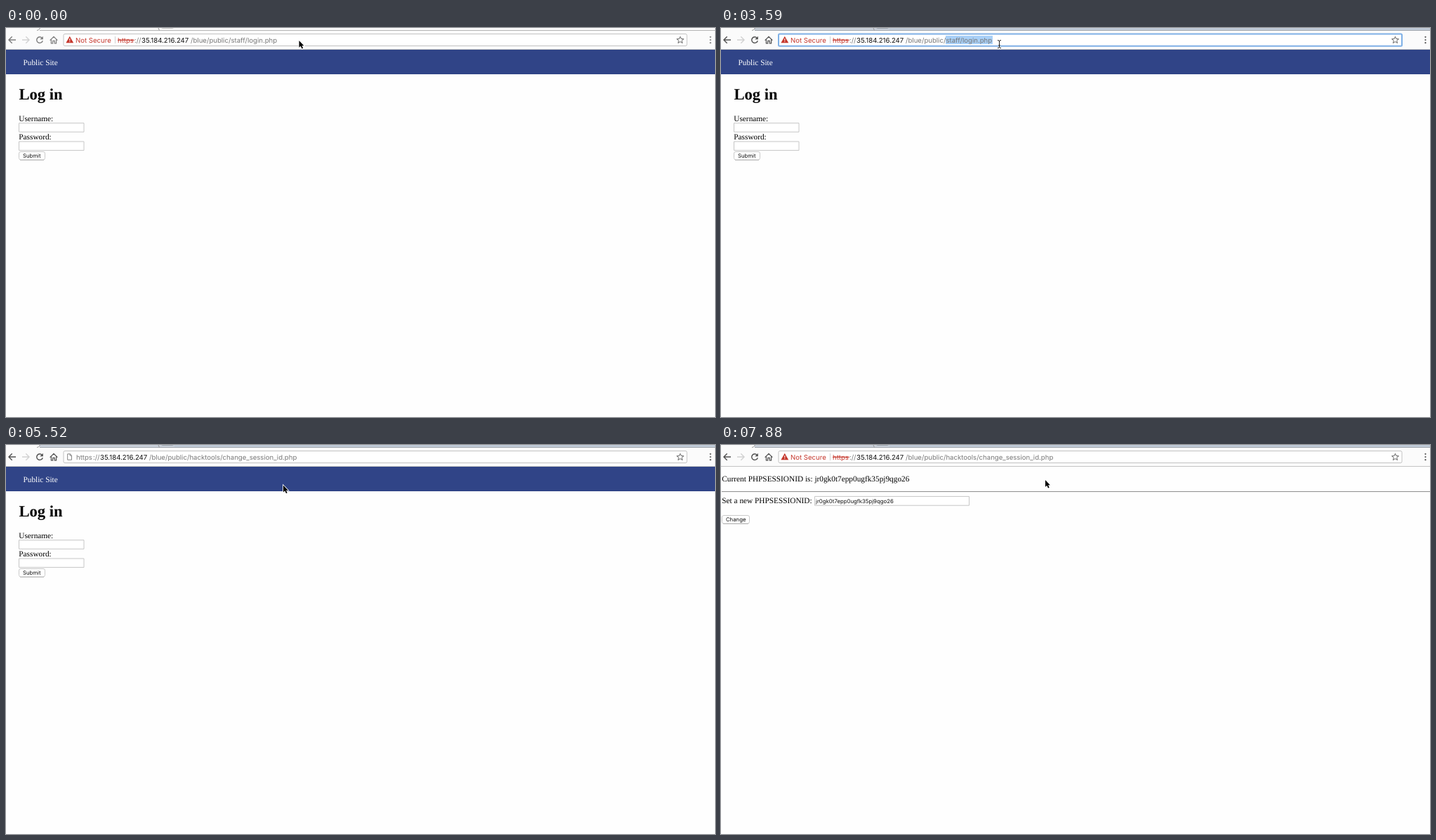
Write an HTML page with a canvas that moves like this. It is 1010 px wide and 555 px high and loops after 8000 ms.

```html
<!DOCTYPE html>
<html lang="en">
<head>
<meta charset="utf-8">
<title>Session page</title>
<style>
html, body { margin: 0; width: 100%; height: 100%; overflow: hidden; background: #fefefe; }
canvas { display: block; }
</style>
</head>
<body>
<canvas id="stage" width="1010" height="555"></canvas>
<script>
const ctx = document.getElementById('stage').getContext('2d');
const LOOP = 8000;
const UI = '9.6px Inter, sans-serif', UI_BOLD = '700 9.75px Inter, sans-serif';
const CONTROL = '7.8px Inter, sans-serif';
const SERIF = '11.3px "Liberation Serif", serif', HEADING = 'bold 22.6px "Liberation Serif", serif';
const GRAY = '#777', RED = '#c5372c', BLUE = '#2f5fd0', RING = '#7fb0e6';
const HOST = '35.184.216.247', BASE = '/blue/public/';
const HACK = 'hacktools/change_session_id.php', LOGIN = 'staff/login.php';
const SESSION = 'jr0gk0t7epp0ugfk35pj9qgo26';

const SUGGESTIONS = [
  ['', '- Plindrek', 279],
  [HACK, '- Change PHPSESSIONID', 432],
  [LOGIN, '- Log in', 346],
  [null, '- Default Search', 264],
  ['staff/index.php', '- Staff: Menu', 348],
];
const ROW_TOP = 33.3, ROW_HEIGHT = 17.75;

// Pointer moves: first step, last step, number of steps, waypoints.
const MOVES = [
  [920, 1510, 5, [[421, 24], [345, 9], [298, 12], [330, 17]]],
  [1810, 2410, 5, [[330, 17], [324, 17], [316, 17], [310.5, 17], [314, 17], [320, 17]]],
  [2860, 3590, 6, [[320, 17], [328, 17], [396.5, 23]]],
  [4790, 5520, 6, [[396.5, 23], [396, 40], [395, 57], [395, 57.5]]],
  [5820, 6840, 8, [[395, 57.5], [371, 58.5], [250, 85], [90, 104], [18, 108]]],
  [6980, 7880, 7, [[18, 108], [3, 109], [120, 92], [330, 62], [462, 50]]],
];

function text(string, x, y, font, color) {
  ctx.font = font;
  ctx.fillStyle = color;
  ctx.fillText(string, x, y);
}

function rect(x, y, w, h, color) {
  ctx.fillStyle = color;
  ctx.fillRect(x, y, w, h);
}

function box(x, y, w, h, radius, fill, stroke, width = 1) {
  ctx.beginPath();
  ctx.roundRect(x, y, w, h, radius);
  ctx.fillStyle = fill;
  ctx.fill();
  ctx.strokeStyle = stroke;
  ctx.lineWidth = width;
  ctx.stroke();
}

function path(d, x, y, stroke, width = 1, fill) {
  const shape = new Path2D(d);
  ctx.save();
  ctx.translate(x, y);
  if (stroke) {
    ctx.strokeStyle = stroke;
    ctx.lineWidth = width;
    ctx.stroke(shape);
  }
  if (fill) {
    ctx.fillStyle = fill;
    ctx.fill(shape);
  }
  ctx.restore();
}

function pointerAt(t) {
  if (t < 150) return [417.5, 18];
  const move = MOVES.findLast(m => t >= m[0]);
  if (!move) return MOVES[0][3][0];
  const [start, end, steps, points] = move;
  const step = Math.min(steps, 1 + Math.floor((t - start) / (end - start) * (steps - 1) + 0.05));
  const along = step / steps * (points.length - 1);
  const i = Math.min(Math.floor(along), points.length - 2);
  return points[i].map((v, axis) => v + (points[i + 1][axis] - v) * (along - i));
}

function selectionAt(t, x) {
  if (t < 320 || t >= 4340) return null;
  if (t < 620) return [159, 387];
  if (t < 2860) return [369, 387];
  return [320, Math.min(387, x)];
}

function button(label, x, y, w) {
  box(x, y, w, 11.5, 2.5, '#fff', '#c4c4c4', 0.9);
  rect(x + 1.5, y + 11.6, w - 3, 0.8, '#b0b0b0');
  text(label, x + 5.4, y + 8.6, CONTROL, '#111');
}

function loginPage() {
  rect(0, 30, 1010, 36, '#304487');
  text('Public Site', 24.5, 52.5, SERIF, '#fff');
  text('Log in', 18.5, 102, HEADING, '#000');
  text('Username:', 18.3, 132.5, SERIF, '#000');
  box(18.5, 135.7, 92.5, 12.6, 0, '#fff', '#c6c6c6');
  text('Password:', 18.3, 159, SERIF, '#000');
  box(18.5, 162, 92.5, 12.6, 0, '#fff', '#c6c6c6');
  button('Submit', 18.5, 176.5, 37);
}

function sessionPage() {
  text('Current PHPSESSIONID is: ' + SESSION, 1.3, 52, SERIF, '#000');
  rect(1, 66, 1009, 1, '#8e8e8e');
  text('Set a new PHPSESSIONID:', 1.3, 83, SERIF, '#000');
  box(133.5, 73.4, 220, 12.8, 0, '#fff', '#c6c6c6');
  text(SESSION, 135, 82.7, CONTROL, '#111');
  button('Change', 1.5, 100.5, 39);
}

function tabStrip(active) {
  rect(0, 0, 1010, 30, '#fbfbfb');
  rect(48, 0, 962, 3, active ? '#c9d0da' : '#fafafa');
  if (active) rect(240, 0, 770, 3, '#c0cad7');
  rect(48, 3, 962, 1, active ? '#a4a9b0' : '#b4b4b4');
  path('M44 3.5Q47 3.5 48.5 0M217 0L218.5 3.5', 0, 0, '#999');
  path('M221 0H239L237 1H223Z', 0, 0, null, 1, active ? '#9da5af' : '#c8c8c8');
  rect(0, 30, 1010, 1, '#c4c4c4');
}

function navigation(active) {
  const ink = active ? '#505050' : '#7d7d7d';
  const arrow = 'M0 0H10M4.7 -4.7L0 0L4.7 4.7';
  path(arrow, 4, 17, ink, 1.4);
  path('M0 0H-10M-4.7 -4.7L0 0L-4.7 4.7', 33, 17, '#d2d2d2', 1.4);
  path('M3.2 -2.9A4.3 4.3 0 1 0 4.2 1.2', 48, 17, ink, 1.4);
  path('M4.8 -5.2V-.7H.3Z', 48, 17, null, 1, ink);
  path('M-5.4 .6L0 -4.6L5.4 .6M-3.6 -.5V4.8H-1.3V1.3H1.3V4.8H3.6V-.5', 68, 17, ink, 1.2);
  for (const y of [12.8, 17, 21.2]) {
    ctx.beginPath();
    ctx.arc(1003.5, y, 1.1, 0, 7);
    ctx.fillStyle = ink;
    ctx.fill();
  }
}

function star() {
  let d = '';
  for (let i = 0; i < 10; i++) {
    const angle = -Math.PI / 2 + i * Math.PI / 5, r = i % 2 ? 2.3 : 5.2;
    d += (i ? 'L' : 'M') + r * Math.cos(angle) + ' ' + r * Math.sin(angle);
  }
  path(d + 'Z', 960.5, 17.3, '#666', 1);
}

function documentIcon(y) {
  path('M-2.8 -4.2H.9L3 -2.1V4.2H-2.8ZM.7 -4.2V-1.9H3', 90.5, y, '#777', 0.9);
}

function url(x, tail, insecure) {
  text('https', x, 20.5, UI, insecure ? RED : GRAY);
  if (insecure) rect(x, 16.8, 24, 1, RED);
  text('://', x + 23.9, 20.5, UI, GRAY);
  text(HOST, x + 34, 20.5, UI, '#111');
  text(BASE + tail, x + 104, 20.5, UI, GRAY);
}

function warning(opening) {
  ctx.save();
  if (opening) ctx.globalAlpha = 0.8;
  path('M0 -5L5.4 4.5H-5.4Z', 90.8, 16.8, null, 1, RED);
  rect(90.3, 15, 1, 3.3, '#fff');
  rect(90.3, 19, 1, 1, '#fff');
  if (opening) {
    ctx.beginPath();
    ctx.rect(100, 8, 30.5, 18);
    ctx.clip();
    text('Not Secure', 102.5, 20, '8.6px Inter, sans-serif', RED);
  } else {
    text('Not Secure', 99, 20.5, UI, RED);
    rect(155, 12, 1, 10, '#d0d0d0');
  }
  ctx.restore();
}

function addressBar(t, x) {
  const focused = t >= 150 && t < 5520, typing = t >= 4340 && t < 5520;
  if (focused) box(82, 8.5, 888, 17.2, 1.5, '#fff', RING, 2);
  else box(82, 8.5, 888, 17, 2, '#fff', '#c2c2c2');
  if (!typing) star();
  const selection = selectionAt(t, x);
  if (selection) rect(selection[0], 11, selection[1] - selection[0], 12, '#a9d0f7');

  if (t >= 4340 && t < 5820) {
    const chosen = t >= 5365;
    documentIcon(17);
    url(100, chosen ? HACK : '', false);
    if (typing) rect(chosen ? 413.3 : 260.3, 11, 1, 12, '#111');
  } else {
    const opening = t >= 5820 && t < 5960;
    warning(opening);
    url(opening ? 140.5 : 159, t < 4340 ? LOGIN : HACK, true);
  }
}

function suggestions(chosen, hovered) {
  rect(355, 126, 545, 2, '#f3f3f3');
  rect(0, 31, 1010, 94, '#fff');
  rect(0, 125, 1010, 1, '#c6c6c6');
  rect(0, 126, 1010, 1, '#efefef');
  SUGGESTIONS.forEach(([tail, title, titleX], i) => {
    const top = ROW_TOP + i * ROW_HEIGHT, middle = top + 9.2, baseline = top + 12.9;
    if (i === chosen) rect(0, Math.round(top), 1010, 18, '#e9e9e9');
    else if (i === hovered) rect(0, Math.round(top), 1010, 18, '#f3f3f3');
    const address = 'https://' + HOST + BASE;
    if (tail === null) {
      path('M2 1A3 3 0 1 1 2 -3A3 3 0 0 1 2 1L4.5 3.8', 89.3, middle + 0.6, '#777', 1.1);
      text(address, 100, baseline, UI, '#111');
    } else {
      documentIcon(middle);
      text(address, 100, baseline, UI_BOLD, BLUE);
      text(tail, 275, baseline, UI, BLUE);
    }
    text(title, titleX, baseline, UI, '#666');
  });
}

function pointer(t, x, y) {
  if (t < 150 || y > 31) {
    path('M0 0V9.8L2.3 7.8L4 11.6L5.7 10.8L4 7.2H6.9Z', x, y, '#fff', 1.6, '#000');
  } else {
    const beam = 'M-2.5 -5.5Q0 -5.5 0 -4Q0 -5.5 2.5 -5.5M0 -4V4.2M-1.3 1.8H1.3M-2.5 5.6Q0 5.6 0 4.2Q0 5.6 2.5 5.6';
    path(beam, x, y, 'rgba(255,255,255,.7)', 2);
    path(beam, x, y, '#222', 1);
  }
}

function draw() {
  const t = performance.now() % LOOP;
  const [x, y] = pointerAt(t);
  const active = t >= 150;
  ctx.textRendering = 'geometricPrecision';
  rect(0, 0, 1010, 555, '#fefefe');
  if (t < 5820) loginPage();
  else sessionPage();
  tabStrip(active);
  navigation(active);
  addressBar(t, x);
  if (t >= 4340 && t < 5520) {
    suggestions(t < 5365 ? 0 : 1, Math.floor((y - ROW_TOP) / ROW_HEIGHT));
  }
  pointer(t, x, y);
  requestAnimationFrame(draw);
}
draw();
</script>
</body>
</html>
```
